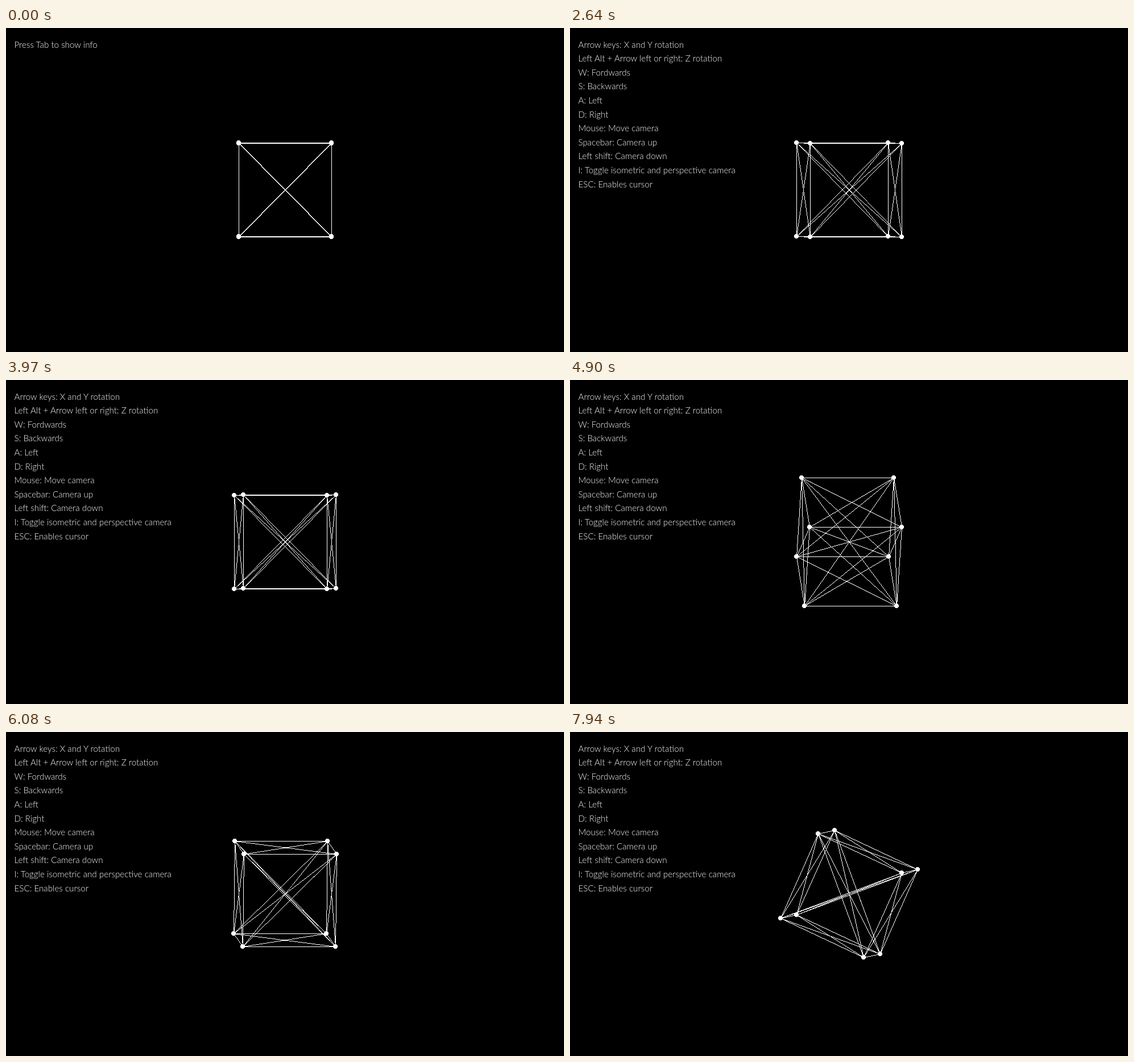
Write an HTML page that moves like this. It is 981 by 571 pixels and loops after 8000 ms.

```html
<!DOCTYPE html>
<html lang="en">
<head>
<meta charset="utf-8">
<title>Rotating cube</title>
<style>
  html, body { margin: 0; width: 100%; height: 100%; overflow: hidden; background: #000; }
  svg { display: block; width: 981px; height: 571px; }
  text { font: 300 15.2px Lato, "Open Sans", sans-serif; fill: #fff; }
  #cube { shape-rendering: crispEdges; fill: #fff; }
</style>
</head>
<body>
<svg id="stage" viewBox="0 0 981 571">
  <g id="hint"></g>
  <g id="help"></g>
  <g id="cube"></g>
</svg>
<script>
const LOOP = 8000;
const HELP_AT = 1120;
const HALF = 81.8;
const STRETCH = 1.005; // vertical scale of the view
const PITCH = 0.0065;  // slight camera tilt
const RATE = 12.2;     // degrees per step

const HELP = [
  "Arrow keys: X and Y rotation",
  "Left Alt + Arrow left or right: Z rotation",
  "W: Fordwards",
  "S: Backwards",
  "A: Left",
  "D: Right",
  "Mouse: Move camera",
  "Spacebar: Camera up",
  "Left shift: Camera down",
  "I: Toggle isometric and perspective camera",
  "ESC: Enables cursor"
];

// Each turn jumps to `first`, then moves by RATE per step until it reaches `to`.
const TURNS = [
  { axis: "y", start: 2640, end: 3110, steps: 8, first: -8.4, to: -82.8 },
  { axis: "y", start: 3510, end: 3970, steps: 8, first: -71.6, to: 5.8 },
  { axis: "x", start: 4640, end: 5160, steps: 9, first: 8.7, to: 98 },
  { axis: "x", start: 5490, end: 6080, steps: 10, first: 90.3, to: -8.3 },
  { axis: "z", start: 6810, end: 7340, steps: 9, first: -11.9, to: -100 },
  { axis: "z", start: 7810, end: 7940, steps: 3, first: -90.2, to: -65.8 }
];

const byId = id => document.getElementById(id);

function add(parent, tag, attrs) {
  const node = document.createElementNS("http://www.w3.org/2000/svg", tag);
  for (const key in attrs) node.setAttribute(key, attrs[key]);
  return parent.appendChild(node);
}

function addLines(group, lines) {
  lines.forEach((line, i) => {
    add(group, "text", { x: 14.5, y: 34.6 + i * 24.6 }).textContent = line;
  });
}

const cube = byId("cube");
const corners = Array.from({ length: 8 }, (_, i) =>
  [1, 2, 4].map(bit => (i & bit ? HALF : -HALF)));

// Every pair of corners is joined.
const edges = corners.flatMap((_, i) =>
  corners.slice(0, i).map((_, j) => ({ i, j, node: add(cube, "polygon") })));
const dots = corners.map(() => add(cube, "circle", { r: 4 }));

addLines(byId("hint"), ["Press Tab to show info"]);
addLines(byId("help"), HELP);

function anglesAt(t) {
  const angles = { x: 0, y: 0, z: 0 };
  for (const { axis, start, end, steps, first, to } of TURNS) {
    if (t < start) break;
    const step = Math.min(steps - 1, Math.floor((t - start + 5) / (end - start) * (steps - 1)));
    const travel = Math.min(step * RATE, Math.abs(to - first));
    angles[axis] = step === steps - 1 ? to : first + Math.sign(to - first) * travel;
  }
  return angles;
}

function rotate(u, v, degrees) {
  const a = degrees * Math.PI / 180;
  const c = Math.cos(a), s = Math.sin(a);
  return [u * c - v * s, u * s + v * c];
}

function project([x, y, z], angles) {
  [y, z] = rotate(y, z, angles.x);
  [z, x] = rotate(z, x, angles.y);
  [x, y] = rotate(x, y, angles.z);
  return [Math.round(490.5 + x), Math.round(285 + y * STRETCH - PITCH * z)];
}

// A line that is one pixel thick along its minor axis, as in unsmoothed drawing.
function pixelLine([x1, y1], [x2, y2]) {
  const flat = Math.abs(x2 - x1) >= Math.abs(y2 - y1);
  const [w, h] = flat ? [0, 1] : [1, 0];
  const [ox, oy] = flat ? [0.5, 0] : [0, 0.5];
  return [[x1, y1], [x2, y2], [x2 + w, y2 + h], [x1 + w, y1 + h]]
    .map(([x, y]) => `${x + ox},${y + oy}`).join(" ");
}

function draw(t) {
  byId("hint").style.display = t < HELP_AT ? "" : "none";
  byId("help").style.display = t < HELP_AT ? "none" : "";

  const angles = anglesAt(t);
  const points = corners.map(corner => project(corner, angles));
  for (const { i, j, node } of edges) {
    node.setAttribute("points", pixelLine(points[i], points[j]));
  }
  points.forEach(([x, y], i) => {
    dots[i].setAttribute("cx", x);
    dots[i].setAttribute("cy", y);
  });
}

const begin = performance.now();
function tick() {
  draw((performance.now() - begin) % LOOP);
  requestAnimationFrame(tick);
}
tick();
</script>
</body>
</html>
```
